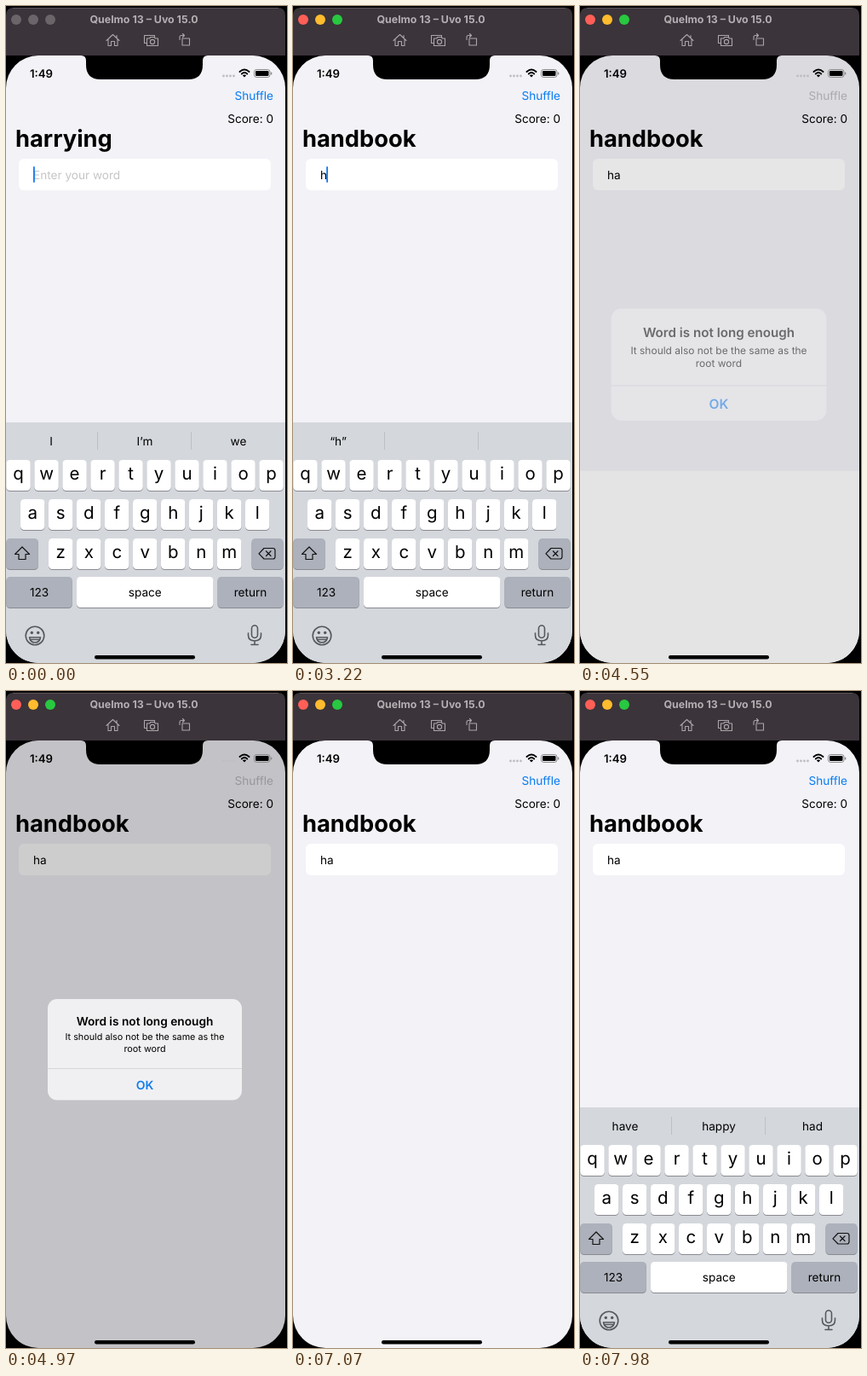
Recreate the animation shown at these times as an HTML page. Size 330 by 770 pixels, loop 8000 ms.

```html
<!DOCTYPE html>
<html lang="en">
<head>
<meta charset="utf-8">
<title>Word game</title>
<style>
  html, body { margin: 0; width: 100%; height: 100%; overflow: hidden; background: #000; }
  svg { display: block; width: 330px; height: 770px; font: 13.6px Inter, sans-serif; text-rendering: geometricPrecision; }
  .mid { text-anchor: middle; }
  .end { text-anchor: end; }
  .letter { font-size: 20.5px; text-anchor: middle; }
  .line { fill: none; stroke-linejoin: round; stroke-linecap: round; }
</style>
</head>
<body>
<svg viewBox="0 0 330 770">
  <defs><clipPath id="screen"><rect y="58" width="328" height="712" rx="38"/></clipPath></defs>

  <path d="M0 58V11Q0 2 9 2H319Q328 2 328 11V58Z" fill="#3b343a"/>
  <path d="M8 2.5H320" stroke="#5b555a"/>
  <g id="lights"><circle cx="12" cy="16" r="6"/><circle cx="32" cy="16" r="6"/><circle cx="52" cy="16" r="6"/></g>
  <text class="mid" x="162" y="20" font-size="12.4" font-weight="700" fill="#b4afb3">Quelmo 13 – Uvo 15.0</text>
  <g class="line" stroke="#aaa5a9" stroke-width="1.1">
    <path d="M118 40.5L125.500 33.500L133 40.500M120 39V46.500H123.500V41.500H127.500V46.500H131V39M130 37V34.500"/>
    <path d="M164.500 43.500H162.500V34.500H174.500V36M165.500 38H168.500L170 36.500H174L175.500 38H178.500V46.500H165.500Z"/>
    <circle cx="172" cy="42" r="2.6"/>
    <path d="M207 38H215.500V46H207ZM204 39.500V36.500Q204 34.500 206 34.500H209M207.500 32.500L209.500 34.500L207.500 36.500"/>
  </g>

  <g clip-path="url(#screen)">
    <rect y="58" width="328" height="712" fill="#f2f2f7"/>
    <text id="shuffleGrey" class="end" x="314" y="109.500" fill="#bcbcc1">Shuffle</text>
    <text id="shuffle" class="end" x="314" y="109.500" fill="#087cf2">Shuffle</text>
    <text class="end" x="314" y="137">Score: 0</text>
    <text id="root" x="11" y="165" font-size="27.300" font-weight="700"></text>
    <rect x="15" y="179" width="296" height="37" rx="6" fill="#fff"/>
    <text id="entry" x="32" y="203"></text>
    <rect id="cursor" y="188" width="1.800" height="19" rx=".9" fill="#1478ee"/>

    <g id="keyboard">
      <rect id="board" y="488" width="328" height="282"/>
      <g id="keys"></g>
    </g>
    <rect id="dim" y="58" width="328" height="712"/>

    <g>
      <text x="28" y="84" font-size="13.200" font-weight="600">1:49</text>
      <g fill="#bdbdc3"><circle cx="255.500" cy="82" r="1.400"/><circle cx="259.500" cy="82" r="1.400"/><circle cx="263.500" cy="82" r="1.400"/><circle cx="267.500" cy="82" r="1.400"/></g>
      <path class="line" d="M274.500 77Q280 72 285.500 77M276.800 79.500Q280 76.700 283.200 79.500" stroke="#000" stroke-width="1.900"/>
      <path d="M277.800 81.300Q280 79.500 282.200 81.300L280 83.600Z"/>
      <rect x="291.500" y="74.500" width="18.500" height="9" rx="2.700" fill="none" stroke="#88888c"/>
      <rect x="293" y="76" width="15.500" height="6" rx="1.300"/>
      <rect x="311" y="77.500" width="1.300" height="3" rx=".6" fill="#88888c"/>
    </g>
    <path d="M88 58Q94 58 94 64V69Q94 86 111 86H214Q231 86 231 69V64Q231 58 237 58Z"/>

    <g id="alert">
      <rect x="49" y="361" width="228" height="118.500" rx="11" fill="#f0f0f2"/>
      <path id="okPressed" d="M49 442H277V468.500Q277 479.500 266 479.500H60Q49 479.500 49 468.500Z" fill="#dadadd"/>
      <path d="M49 442.500H277" stroke="#d0d0d4" stroke-width=".8"/>
      <g class="mid">
        <text x="163" y="391.500" font-size="13.700" font-weight="600">Word is not long enough</text>
        <g font-size="10.800"><text x="163" y="409">It should also not be the same as the</text><text x="163" y="422.500">root word</text></g>
        <text x="163" y="467" font-size="14" font-weight="600" fill="#107cf0">OK</text>
      </g>
    </g>
    <rect x="104" y="761" width="118" height="4.500" rx="2.200"/>
  </g>
</svg>

<script>
const LOOP = 8000;
const $ = id => document.getElementById(id);
const set = (id, name, value) => $(id).setAttribute(name, value);
const fade = (id, amount) => set(id, 'opacity', amount);

// Keyboard construction
const DARK = '#adb1bb';
const key = (x, y, w, label = '', { fill = '#fff', id = '', letter = true } = {}) => `
  <rect x="${x}" y="${y + 1}" width="${w}" height="36" rx="4.500" fill="#898b91"/>
  <rect id="${id}" x="${x}" y="${y}" width="${w}" height="36" rx="4.500" fill="${fill}"/>
  <text class="${letter ? 'letter' : 'mid'}" x="${x + w / 2}" y="${y + 23}">${label}</text>`;
const row = (letters, x, y) => [...letters].map((c, i) => key(x + 33 * i, y, 28.5, c)).join('');
const popup = (id, c, x) => `<g id="${id}">
  <path d="M${x - 19} 527H${x + 19}Q${x + 25} 527 ${x + 25} 533V557C${x + 25} 568 ${x + 14} 567 ${x + 14} 578V610Q${x + 14} 614 ${x + 10} 614H${x - 10}Q${x - 14} 614 ${x - 14} 610V578C${x - 14} 567 ${x - 25} 568 ${x - 25} 557V533Q${x - 25} 527 ${x - 19} 527Z" fill="#fff" stroke="#b9bcc2" stroke-width=".7"/>
  <text class="mid" x="${x}" y="557" font-size="31">${c}</text></g>`;

$('keys').innerHTML =
  [53, 163, 273].map((x, i) => `<text id="hint${i}" class="mid" x="${x}" y="514.500"></text>`).join('') +
  '<path d="M107.500 499V520M217.500 499V520" stroke="#bdc0c6"/>' +
  row('qwertyuiop', 0.3, 532) + row('asdfghjkl', 17, 578) + row('zxcvbnm', 50, 624) +
  key(0.3, 624, 37.5, '', { fill: DARK }) + key(288.5, 624, 37, '', { fill: DARK }) +
  key(0.3, 669, 77.5, '123', { fill: DARK, letter: false }) +
  key(83, 669, 160.5, 'space', { letter: false }) +
  key(248.5, 669, 77, 'return', { fill: DARK, id: 'return', letter: false }) +
  `<g class="line" stroke="#111" stroke-width="1.200">
    <path d="M19 634L27.500 642.500H23V648.500H15V642.500H10.500Z"/>
    <path d="M303 635.500H313.500Q316 635.500 316 638V645.500Q316 648 313.500 648H303L297 641.800ZM305.500 639L311 644.500M311 639L305.500 644.500"/>
  </g>
  <g class="line" stroke="#55585e" stroke-width="1.600">
    <circle cx="34" cy="738" r="10.800"/>
    <path d="M27.500 740H40.500Q39.500 746 34 746T27.500 740ZM28.500 742.500H39.500"/>
    <rect x="288.500" y="726" width="7" height="14.500" rx="3.500"/>
    <path d="M284.500 735V737.500Q284.500 744 292 744T299.500 737.500V735M292 744V748.500M288 748.500H296"/>
  </g>
  <g fill="#55585e"><circle cx="30.300" cy="734.500" r="1.700"/><circle cx="37.700" cy="734.500" r="1.700"/></g>` +
  popup('popH', 'h', 196.3) + popup('popA', 'a', 31.3);

// Timing helpers
const ramp = (t, start, end) => Math.min(1, Math.max(0, (t - start) / (end - start)));
const ease = (t, start, end) => { const p = ramp(t, start, end); return p * p * (3 - 2 * p); };
const within = (t, start, end) => t >= start && t < end ? 1 : 0;

function cursorOpacity(t) {
  if (t < 2980) return 1 - ramp(t, 350, 560) + ramp(t, 770, 980)
    - ramp(t, 1610, 1820) + ramp(t, 2030, 2240) - ramp(t, 2730, 2940);
  if (t < 4340) return 1;
  return ramp(t, 7350, 7490) - ramp(t, 7770, 7950);
}

function draw(t) {
  const active = t >= 1120;
  ['#ff5f57', '#febc2e', '#28c840'].forEach((color, i) =>
    $('lights').children[i].setAttribute('fill', active ? color : '#6b656a'));

  const typed = t < 3080 ? '' : t < 3570 ? 'h' : 'ha';
  const hints = { '': ['I', 'I’m', 'we'], h: ['“h”', '', ''], ha: ['have', 'happy', 'had'] }[typed];
  hints.forEach((word, i) => $('hint' + i).textContent = word);
  $('root').textContent = t < 1330 ? 'harrying' : 'handbook';
  $('entry').textContent = typed || 'Enter your word';
  set('entry', 'fill', typed ? '#000' : '#c5c5c8');
  set('cursor', 'x', 32 + [0, 7.2, 15.5][typed.length]);
  fade('cursor', cursorOpacity(t));

  fade('popH', within(t, 2870, 3080));
  fade('popA', within(t, 3360, 3570));
  set('return', 'fill', within(t, 4200, 4340) ? '#fff' : DARK);

  const closing = within(t, 4410, 7000);
  const hidden = ease(t, 4410, 4900) - ease(t, 7070, 7500);
  set('keyboard', 'transform', `translate(0 ${282 * hidden})`);
  set('board', 'fill', closing ? '#fdfdfd' : '#d4d7dc');
  fade('keys', 1 - closing);

  const appear = ease(t, 4410, 4690);
  const shown = appear - ease(t, 6110, 6510);
  const scale = 1.22 - 0.22 * appear;
  fade('dim', 0.195 * shown);
  fade('alert', shown);
  set('alert', 'transform', `translate(163 420.5) scale(${scale}) translate(-163 -420.5)`);
  fade('okPressed', within(t, 6050, 6600));

  const grey = Math.min(1, 2 * shown);
  const pressed = within(t, 1190, 1330) ? 0.3 : t < 1190 ? 1 : 0.3 + 0.7 * ramp(t, 1330, 1540);
  fade('shuffle', pressed * (1 - grey));
  fade('shuffleGrey', grey);
}

const start = performance.now();
function frame() {
  draw((performance.now() - start) % LOOP);
  requestAnimationFrame(frame);
}
frame();
</script>
</body>
</html>
```
